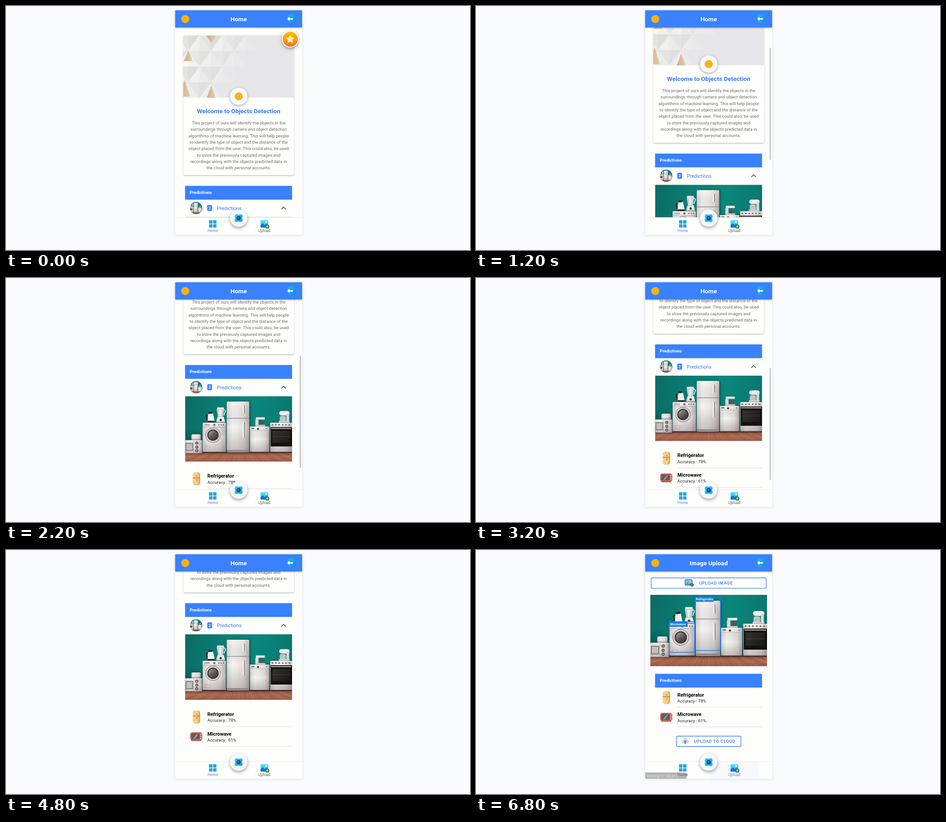
These frames come from a looping animation (1030x544 px, 7000 ms). An HTML page with a canvas:

```html
<!DOCTYPE html>
<html lang="en">
<head>
<meta charset="utf-8">
<title>Objects Detection</title>
<style>
html, body { margin: 0; width: 100%; height: 100%; overflow: hidden; background: #fafbfd; }
canvas { display: block; width: 1030px; height: 544px; }
</style>
</head>
<body>
<canvas id="stage" width="1030" height="544"></canvas>
<script>
const ctx = document.getElementById('stage').getContext('2d');
const LOOP = 7000, STEP = 200;
const K = 281.6 / 412;               // device pixels to stage pixels
const BLUE = '#3981fd', PAPER = '#fefefd';
const LEFT = 375.7, WIDTH = 281.6, MID = 516.5;

// Scroll offset over time: [ms, px]
const SCROLL = [[600, 0], [800, 3], [1200, 72], [1600, 135], [2000, 190], [2200, 207],
  [2600, 207], [2800, 209], [3000, 226], [3200, 253], [3400, 282.5]];

const INTRO = [
  'This project of ours will identify the objects in the',
  'surroundings through camera and object detection',
  'algorithms of machine learning. This will help people',
  'to identify the type of object and the distance of the',
  'object placed from the user. This could also, be used',
  'to store the previously captured images and',
  'recordings along with the objects predicted data in',
  'the cloud with personal accounts.'
];

function scrollAt(t) {
  if (t <= SCROLL[0][0]) return 0;
  for (let i = 1; i < SCROLL.length; i++) {
    const [t0, a] = SCROLL[i - 1], [t1, b] = SCROLL[i];
    if (t <= t1) return a + (b - a) * (t - t0) / (t1 - t0);
  }
  return SCROLL[SCROLL.length - 1][1];
}

function rnd(i, j) {
  const v = Math.sin(i * 127.1 + j * 311.7 + 4.2) * 43758.5453;
  return v - Math.floor(v);
}

function box(x, y, w, h, fill, r = 0) {
  ctx.fillStyle = fill;
  ctx.beginPath();
  ctx.roundRect(x, y, w, h, r);
  ctx.fill();
}

function frame(x, y, w, h, color, lw, r = 0) {
  ctx.strokeStyle = color;
  ctx.lineWidth = lw;
  ctx.beginPath();
  ctx.roundRect(x, y, w, h, r);
  ctx.stroke();
}

function disc(x, y, r, fill) {
  ctx.fillStyle = fill;
  ctx.beginPath();
  ctx.arc(x, y, r, 0, Math.PI * 2);
  ctx.fill();
}

function poly(points, fill) {
  ctx.fillStyle = fill;
  ctx.beginPath();
  points.forEach(([x, y]) => ctx.lineTo(x, y));
  ctx.closePath();
  ctx.fill();
}

function line(points, color, lw) {
  ctx.strokeStyle = color;
  ctx.lineWidth = lw;
  ctx.beginPath();
  points.forEach(([x, y]) => ctx.lineTo(x, y));
  ctx.stroke();
}

function grad(x0, y0, x1, y1, ...colors) {
  const g = ctx.createLinearGradient(x0, y0, x1, y1);
  colors.forEach((c, i) => g.addColorStop(i / (colors.length - 1), c));
  return g;
}

function shadowed(blur, dy, alpha, draw) {
  ctx.save();
  ctx.shadowColor = `rgba(0,0,0,${alpha})`;
  ctx.shadowBlur = blur;
  ctx.shadowOffsetY = dy;
  draw();
  ctx.restore();
}

function text(str, x, y, size, color, opt = {}) {
  const { weight = 400, align = 'left', gap = 0, family = 'Roboto' } = opt;
  ctx.font = `${weight} ${size * K}px ${family}, sans-serif`;
  ctx.letterSpacing = `${gap * size * K}px`;
  ctx.textAlign = align;
  ctx.fillStyle = color;
  ctx.fillText(str, x, Math.round(y));
  ctx.letterSpacing = '0px';
}

// White enamel body with a soft shadow on the wall behind it
function body(x, y, w, h, r = 1) {
  ctx.save();
  ctx.shadowColor = 'rgba(0,25,25,.6)';
  ctx.shadowBlur = 5;
  ctx.shadowOffsetX = 1.5;
  box(x, y, w, h, grad(x, 0, x + w, 0, '#d9d6d5', '#f6f5f4', '#efedec', '#e2dfde', '#b5b0ae'), r);
  ctx.restore();
  box(x, y, w, h, grad(0, y, 0, y + h, 'rgba(255,255,255,.3)', 'rgba(70,50,45,0)', 'rgba(70,50,45,.28)'), r);
}

// Kitchen scene, 238 x 146 units
function kitchen(x, y, scale) {
  ctx.save();
  ctx.translate(x, y);
  ctx.scale(scale, scale);
  ctx.beginPath();
  ctx.rect(0, 0, 237.5, 146);
  ctx.clip();

  box(0, 0, 238, 125, grad(0, 0, 238, 30, '#0b6c65', '#0a7d74', '#0b867c', '#0a776f'));
  box(0, 70, 238, 55, grad(0, 70, 0, 125, 'rgba(0,40,38,0)', 'rgba(0,40,38,.45)'));
  box(0, 123, 238, 23, grad(0, 123, 0, 146, '#7a4636', '#ad6b54', '#9c5a45'));
  for (let i = -8; i <= 24; i++) {
    line([[119 + i * 10, 123], [119 + i * 17, 146]], i % 2 ? '#86493a' : '#bd8069', 0.7);
  }
  box(0, 122, 238, 5, 'rgba(45,20,15,.5)');

  // Toaster and small oven
  body(14, 85, 21, 14, 3);
  body(0, 98, 38, 29);
  box(1, 104, 17, 18, '#7d7876');
  box(3, 106, 13, 14, '#c3bfbd');
  for (const ky of [104.5, 113.5, 121.5]) {
    disc(26, ky, 3.4, '#5d5654');
    disc(26, ky, 1.5, '#b9b3b1');
  }
  line([[19.5, 99], [19.5, 126]], '#999391', 0.7);

  // Kettle
  line([[51, 41], [47, 43], [49, 54]], '#1d2222', 2.2);
  poly([[51, 40], [62, 38], [66, 57], [50, 57]], '#f1f0ee');
  box(50, 55, 16, 3.5, '#2c2a29', 1);
  box(52, 35, 9, 4, '#222829', 2);

  // Blender
  poly([[70, 28], [87, 28], [84, 46], [73, 46]], '#c2d2cf');
  poly([[75, 30], [82, 30], [80, 45], [76, 45]], '#e5ecea');
  box(71, 25, 15, 3.5, '#f4f3f2', 1);
  line([[86, 30], [90, 33], [86, 43]], '#eeedec', 1.8);
  poly([[72, 46], [86, 46], [89, 58], [69, 58]], '#e9e7e5');
  disc(79, 53, 2.5, '#3b3736');

  // Washing machine
  body(39, 59, 52, 65, 1.5);
  line([[39, 69], [91, 69]], '#9f9997', 0.8);
  box(43, 62, 12, 4, '#b5afad');
  disc(65, 64, 2.6, '#837c7a');
  for (const kx of [75, 80, 85]) disc(kx, 64, 1.3, '#6a6361');
  disc(62, 87, 17, '#8e8886');
  disc(62, 87, 15.7, '#d8d4d2');
  disc(62, 87, 12.6, '#3a3534');
  disc(62, 87, 10.2, grad(54, 78, 70, 96, '#a29d9b', '#605a58', '#3b3635'));
  frame(45, 112, 10, 7, '#a6a09e', 0.7);

  // Refrigerator
  body(92.5, 12, 50, 113, 2.5);
  box(92.5, 48.5, 50, 1.5, '#8f8987');
  box(92.5, 120, 50, 4, '#8f8886');
  for (const [hy, h] of [[20, 18], [58, 34]]) {
    box(129, hy, 3.8, h, '#938d8b', 1.5);
    box(128.3, hy, 2.3, h, '#fbfafa', 1);
  }

  // Coffee maker and dishwasher
  box(157, 47, 20, 5, '#efedec', 1);
  box(156, 52, 7, 15, '#dcd8d6');
  box(164, 54, 11, 10, '#4b5957', 2);
  box(156, 64, 22, 4, '#ebe8e7', 1);
  body(144, 67.5, 43, 56.5);
  line([[144, 77], [187, 77]], '#aaa4a2', 0.7);
  box(147, 70.5, 7, 3, '#7f7977');
  disc(162, 73, 2.2, '#322e2d');
  disc(181, 72.5, 1.2, '#67605e');

  // Mixer and oven
  box(209, 33, 23, 10, '#efedec', 5);
  box(225, 38, 6, 18, '#dcd8d6', 2);
  box(210, 44, 14, 12, '#bcc5c3', 4);
  box(208, 55, 24, 4, '#ebe8e7', 1);
  body(189, 59, 49, 65);
  box(190, 69, 48, 43, '#131111');
  box(194, 77, 39, 27, grad(194, 77, 233, 104, '#373231', '#1b1817'));
  box(191, 71, 45, 2, '#c9c5c3', 1);
  line([[194, 90], [233, 90]], '#5b5553', 0.6);
  for (let i = 0; i < 6; i++) disc(194 + i * 7.5, 64, 1.7, '#615a58');
  ctx.restore();
}

// Faceted paper pattern fading to plain grey on the right
function facets(x, y, w, h) {
  ctx.save();
  ctx.beginPath();
  ctx.roundRect(x, y, w, h, [3, 3, 0, 0]);
  ctx.clip();
  box(x, y, w, h, '#e6e6e9');
  const half = 25.5, rowH = 35;
  for (let r = 0; r < 4; r++) {
    for (let c = -1; c < 8; c++) {
      const up = (r + c) % 2 !== 0;
      const cx = x + 10.5 + c * half, top = y - 1 + r * rowH;
      const tip = up ? top : top + rowH, base = up ? top + rowH : top;
      const reach = 150 - r * 27 - c * half;
      ctx.globalAlpha = Math.max(0, Math.min(1, reach / 80 + rnd(c, r) * 0.3));
      const tone = (up ? 234 : 222) + rnd(c, r + 5) * 10;
      for (const side of [-1, 1]) {
        const v = Math.round(tone - side * 3);
        poly([[cx, tip], [cx, base], [cx + side * half, base]], `rgb(${v},${v},${v - 1})`);
      }
    }
  }
  ctx.globalAlpha = 1;
  // Gold facets: centre, tip, base, half width
  for (const [cx, tip, base, hw] of [[11, 33, 57, 10], [62, 17, 0, 11], [3, 98, 136, 12], [62, 112, 139, 10]]) {
    poly([[x + cx, y + tip], [x + cx - hw, y + base], [x + cx + hw, y + base]],
      grad(x + cx - hw, 0, x + cx + hw, 0, '#cfae83', '#e2cdaf'));
  }
  ctx.restore();
}

function star(x, y) {
  shadowed(6, 2.5, 0.4, () => disc(x, y, 19, '#fbfaf6'));
  disc(x, y, 16.8, grad(x, y - 17, x, y + 17, '#ffbd00', '#ff9a10', '#ff6d1f'));
  const points = [];
  for (let i = 0; i < 10; i++) {
    const a = -Math.PI / 2 + i * Math.PI / 5, r = i % 2 ? 5.4 : 10.5;
    points.push([x + r * Math.cos(a), y + r * Math.sin(a)]);
  }
  poly(points, '#fff0b4');
}

function fridgeIcon(x, y) {
  box(x - 7.5, y - 14, 16, 28.5, '#e5a04a', 5);
  box(x - 7.5, y - 14, 13, 28, '#fbce80', 5);
  line([[x - 7.5, y - 2], [x + 8.5, y - 2]], '#a7692f', 1.2);
  line([[x + 1.5, y - 8], [x + 1.5, y - 4]], '#8f5a2c', 1.2);
  line([[x + 1.5, y], [x + 1.5, y + 5]], '#8f5a2c', 1.2);
}

function microwaveIcon(x, y) {
  box(x - 11, y + 7, 22, 3, '#5a3a36', 1);
  box(x - 13.5, y - 9.5, 27, 18.5, '#cf6a55', 5);
  box(x - 11, y - 7, 18.5, 13, '#7a4a44', 2);
  box(x - 10, y - 6, 16, 11, '#5d5f60', 1);
  poly([[x - 7, y + 4.5], [x + 1, y - 5.5], [x + 4, y - 5.5], [x - 2, y + 4.5]], '#94989a');
  for (const d of [-5, 0, 4]) disc(x + 10.3, y + d, 1.2, '#f0c2ae');
}

function row(y, name, accuracy, icon) {
  icon(422.3, y);
  text(name, 447, y - 2.2, 16, '#000', { weight: 700 });
  text(`Accuracy : ${accuracy}%`, 447, y + 11, 14, '#222');
  box(447, y + 21.3, 188, 1, '#dedede');
}

function results(y) {
  row(y, 'Refrigerator', 78, fridgeIcon);
  row(y + 43.7, 'Microwave', 61, microwaveIcon);
}

function predictionBar(y) {
  box(397.5, y, 237.5, 30.7, BLUE);
  text('Predictions', 408, y + 18, 14, '#fff', { weight: 700 });
}

function homePage(s) {
  const y = -s;
  shadowed(3.5, 0.7, 0.22, () => box(393.5, y + 66, 246, 311.3, PAPER, 3));
  shadowed(1, 1, 0.2, () => box(394, y + 300, 245, 77.3, PAPER, 3));
  facets(393.5, y + 66, 246, 138.5);
  shadowed(6, 2, 0.35, () => disc(MID, y + 201.5, 19.3, '#f8fafa'));
  disc(MID, y + 201.5, 9, '#fdb112');
  text('Welcome to Objects Detection', MID, y + 239, 20, '#3a7de9', { weight: 700, align: 'center' });
  INTRO.forEach((str, i) =>
    text(str, MID, y + 263.8 + i * 14.36, 14, '#6a6a6a', { align: 'center' }));

  predictionBar(y + 401);
  ctx.save();
  ctx.beginPath();
  ctx.arc(422, y + 450.5, 13.7, 0, Math.PI * 2);
  ctx.clip();
  kitchen(422 - 119 * 0.19, y + 450.5 - 73 * 0.19, 0.19);
  ctx.restore();
  box(446.8, y + 443.8, 10.6, 13.4, BLUE, 2.6);
  text('2', 452.1, y + 454, 13, '#fff', { weight: 700, align: 'center' });
  text('Predictions', 468, y + 454.5, 16, '#3478ea');
  line([[611, y + 453.3], [616.2, y + 448], [621.4, y + 453.3]], '#5c5c5c', 1.8);
  kitchen(397.5, y + 470.4, 1);
  results(y + 654.6);
  star(631, y + 74);
}

function pictureIcon(x, y, w, h) {
  box(x, y, w, h, '#2b5570', 1.5);
  box(x + 1.2, y + 1.2, w - 2.4, h - 2.4, '#6fc8f0', 1);
  disc(x + w * 0.7, y + h * 0.32, 1.8, '#fbd455');
  poly([[x + 1.2, y + h - 1.2], [x + w * 0.35, y + h * 0.4], [x + w * 0.6, y + h * 0.75],
    [x + w * 0.75, y + h * 0.55], [x + w - 1.2, y + h - 1.2]], '#57ae68');
}

function tag(x, y, w, h, name, tagW) {
  frame(x, y, w, h, '#1b78ee', 1.5);
  box(x - 0.7, y - 0.7, tagW, 11.6, '#127cf5');
  text(name, x + 1.8, y + 7.5, 10, '#fff', { weight: 700, family: 'Liberation Sans' });
}

function uploadPage() {
  const caps = { weight: 500, gap: 0.06 };
  frame(388.7, 62.2, 255.6, 23.2, BLUE, 1.4, 2.5);
  pictureIcon(463.5, 65.5, 17, 13.5);
  disc(479.5, 78, 3.6, '#2b5570');
  disc(479.5, 78, 1.3, '#9bc8dc');
  text('UPLOAD IMAGE', 495, 77, 14, '#3d78e2', caps);
  kitchen(387, 100, 259 / 237.5);
  tag(486.5, 104.7, 56.5, 119.3, 'Refrigerator', 41.5);
  tag(429, 160, 56.5, 68, 'Microwave', 41.5);
  predictionBar(276);
  results(328.8);
  frame(445.2, 415, 143, 23.2, BLUE, 1.4, 2.5);
  for (const [dx, dy, r] of [[-4, 1, 4], [0, -2, 5], [4.5, 1, 3.8]]) disc(464.5 + dx, 426 + dy, r, '#d6dbe2');
  box(457, 426, 16, 5, '#d6dbe2', 2.5);
  poly([[464.5, 423.5], [468.5, 428], [460.5, 428]], '#2f8fd8');
  box(463.3, 427.5, 2.4, 5.5, '#2f8fd8');
  text('UPLOAD TO CLOUD', 484, 429.5, 14, '#3d78e2', caps);
}

function header(title) {
  shadowed(2.5, 1, 0.35, () => box(LEFT, 9.6, WIDTH, 38.2, BLUE));
  disc(398, 29, 9, '#fdb112');
  text(title, MID, 33.6, 20, '#fff', { weight: 600, align: 'center' });
  disc(634, 28.7, 10.8, grad(624, 22, 645, 36, '#20b4e8', '#229ce2', '#2a80e6'));
  poly([[624.5, 28.7], [629.5, 24], [629.5, 27.2], [637, 27.2], [637, 30.2], [629.5, 30.2], [629.5, 33.4]], '#fff');
}

function cameraButton() {
  shadowed(7, 2.5, 0.4, () => disc(MID, 473, 19.3, '#f7f8fa'));
  box(508, 464.5, 17, 17, grad(508, 464, 525, 482, '#25d4f8', '#16a6f4'), 3.5);
  for (const [dx, dy] of [[0, -8.5], [0, 8.5], [-8.5, 0], [8.5, 0]]) {
    disc(MID + dx, 473 + dy, 1.6, '#f7f8fa');
  }
  disc(MID, 473, 6, '#1592e4');
  disc(MID, 473, 4.2, '#174a78');
  disc(MID - 0.6, 472.4, 1.8, '#3f8fc0');
}

function tabs(upload, ripple) {
  const label = { align: 'center', gap: 0.03 };
  const color = on => on ? '#4a78e4' : '#505154';
  box(LEFT, 471, WIDTH, 39, PAPER);
  box(LEFT, 471, WIDTH, 1, '#ebecec');
  if (ripple) box(518, 472, 111, 38, '#f8f9fd');
  for (let i = 0; i < 4; i++) {
    box(450.7 + (i % 2) * 8.9, 477.6 + (i >> 1) * 8.8, 7.6, 7.6, '#27a5e3', 1);
  }
  text('Home', 459, 504.3, 12, color(!upload), label);
  box(565, 477.5, 17, 16.5, grad(0, 477, 0, 494, '#54dcfb', '#35bdf5'), 2);
  poly([[565, 494], [565, 489], [570, 484], [574, 488.5], [577.5, 485.5], [582, 490], [582, 494]], '#1672d2');
  disc(577.5, 481.5, 1.7, '#f2fbff');
  disc(580, 491.8, 4.8, '#178048');
  line([[577.3, 491.8], [582.7, 491.8]], '#fff', 1.3);
  line([[580, 489.1], [580, 494.5]], '#fff', 1.3);
  text('Upload', 573.6, 504.3, 12, color(upload), label);
  cameraButton();
}

function statusBubble() {
  box(LEFT, 496, 92, 14, 'rgba(90,90,95,.46)', [0, 2, 0, 0]);
  text('Waiting for api.pos...', 379, 506, 11.7, 'rgba(255,255,255,.75)', { family: 'Open Sans' });
}

function scrollbar(t, s) {
  const shown = (t >= 800 && t < 2600) || (t >= 2800 && t < 4000);
  if (!shown) return;
  ctx.globalAlpha = t >= 3800 ? 0.5 : 1;
  box(652.2, 50.3 + s * 0.594, 2, 250, '#b0b0b0', 1);
  ctx.globalAlpha = 1;
}

function draw(t) {
  const s = scrollAt(t), upload = t >= 6600;
  box(0, 0, 1030, 544, '#fafbfd');
  shadowed(6, 1, 0.12, () => box(LEFT, 9.6, WIDTH, 500.6, PAPER));
  ctx.save();
  ctx.beginPath();
  ctx.rect(LEFT, 47, WIDTH, 424);
  ctx.clip();
  if (upload) uploadPage();
  else {
    homePage(s);
    scrollbar(t, s);
  }
  ctx.restore();
  header(upload ? 'Image Upload' : 'Home');
  tabs(t >= 6400, t >= 6800);
  if (t >= 6400) statusBubble();
}

const start = performance.now();
function tick() {
  const t = (performance.now() - start) % LOOP;
  draw(Math.floor(t / STEP) * STEP);
  requestAnimationFrame(tick);
}
tick();
</script>
</body>
</html>
```
